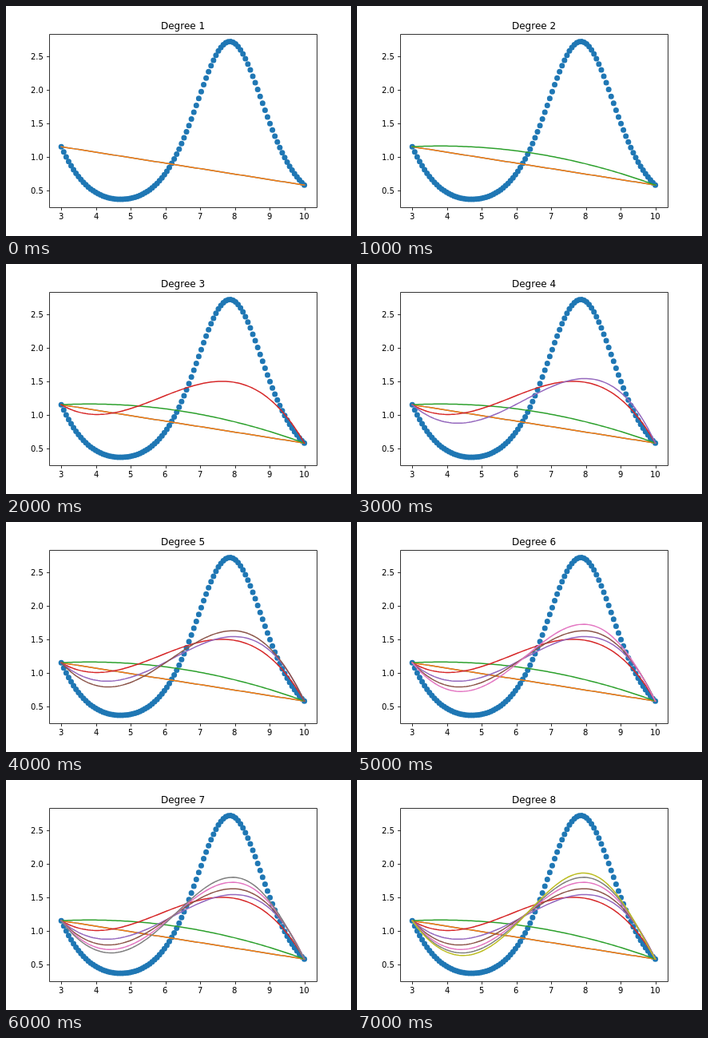
An HTML page with a canvas that plays this animation: 432 by 288 pixels, repeating every 8000 ms.

```html
<!DOCTYPE html>
<html lang="en">
<head>
<meta charset="utf-8">
<title>Bernstein approximation</title>
<style>
  html, body { margin: 0; width: 100%; height: 100%; overflow: hidden; background: #fff; }
  canvas { display: block; }
</style>
</head>
<body>
<canvas id="chart" width="432" height="288"></canvas>
<script>
const ctx = document.getElementById('chart').getContext('2d');
const COLORS = ['#1f77b4', '#ff7f0e', '#2ca02c', '#d62728', '#9467bd',
                '#8c564b', '#e377c2', '#7f7f7f', '#bcbd22'];
const LEFT = 54, RIGHT = 388.8, TOP = 34.56, BOTTOM = 252;
const X_MIN = 3, X_MAX = 10, Y_MIN = Math.exp(-1), Y_MAX = Math.E;
const POINTS = 100, STEP_MS = 1000, MAX_DEGREE = 8;

const f = x => Math.exp(Math.sin(x));
const lerp = (a, b, t) => a + (b - a) * t;

// The data range fills the axes except for a 5% margin on each side.
const fit = u => (u + 0.05) / 1.1;
const px = x => lerp(LEFT, RIGHT, fit((x - X_MIN) / (X_MAX - X_MIN)));
const py = y => lerp(BOTTOM, TOP, fit((y - Y_MIN) / (Y_MAX - Y_MIN)));
const snap = v => Math.floor(v + 0.5) + 0.5;

const params = Array.from({ length: POINTS }, (_, i) => i / (POINTS - 1));

// Bernstein polynomial of f, evaluated by repeated interpolation.
function bernstein(degree, t) {
  let values = Array.from({ length: degree + 1 }, (_, k) => f(lerp(X_MIN, X_MAX, k / degree)));
  while (values.length > 1) values = values.slice(1).map((v, i) => lerp(values[i], v, t));
  return values[0];
}

function curvePath(degree) {
  const path = new Path2D();
  for (const t of params) path.lineTo(px(lerp(X_MIN, X_MAX, t)), py(bernstein(degree, t)));
  return path;
}

const curves = Array.from({ length: MAX_DEGREE }, (_, i) => curvePath(i + 1));

function text(str, x, baseline, size, align) {
  ctx.font = `${size}px "DejaVu Sans", sans-serif`;
  ctx.fillText(str, Math.round(x - ctx.measureText(str).width * align), Math.round(baseline));
}

function line(x1, y1, x2, y2) {
  ctx.beginPath();
  ctx.moveTo(x1, y1);
  ctx.lineTo(x2, y2);
  ctx.stroke();
}

function drawDots() {
  ctx.fillStyle = COLORS[0];
  for (const t of params) {
    const x = lerp(X_MIN, X_MAX, t);
    ctx.beginPath();
    ctx.arc(px(x), py(f(x)), 3.5, 0, 2 * Math.PI);
    ctx.fill();
  }
}

function drawCurve(degree, color) {
  ctx.strokeStyle = color;
  ctx.stroke(curves[degree - 1]);
}

function drawAxes() {
  ctx.strokeStyle = ctx.fillStyle = '#000';
  ctx.lineWidth = 0.8;
  const left = snap(LEFT), top = snap(TOP), bottom = snap(BOTTOM);
  ctx.strokeRect(left, top, snap(RIGHT) - left, bottom - top);
  for (let x = 3; x <= 10; x++) {
    line(snap(px(x)), bottom, snap(px(x)), bottom + 3.5);
    text(String(x), px(x), 267, 10, 0.5);
  }
  for (let y = 0.5; y <= 2.5; y += 0.5) {
    line(left, snap(py(y)), left - 3.5, snap(py(y)));
    text(y.toFixed(1), 47, py(y) + 3.8, 10, 1);
  }
}

function draw(now) {
  const degree = Math.floor(now / STEP_MS) % MAX_DEGREE + 1;
  ctx.fillStyle = '#fff';
  ctx.fillRect(0, 0, 432, 288);
  drawDots();
  ctx.lineWidth = 1.5;
  ctx.lineJoin = 'round';
  ctx.lineCap = 'square';
  drawCurve(1, COLORS[0]); // the straight line is plotted twice
  for (let d = 1; d <= degree; d++) drawCurve(d, COLORS[d]);
  ctx.lineCap = 'butt';
  drawAxes();
  text(`Degree ${degree}`, (LEFT + RIGHT) / 2, 29, 12, 0.5);
}

const start = performance.now();
function tick() {
  draw(performance.now() - start);
  requestAnimationFrame(tick);
}
tick();
</script>
</body>
</html>
```
